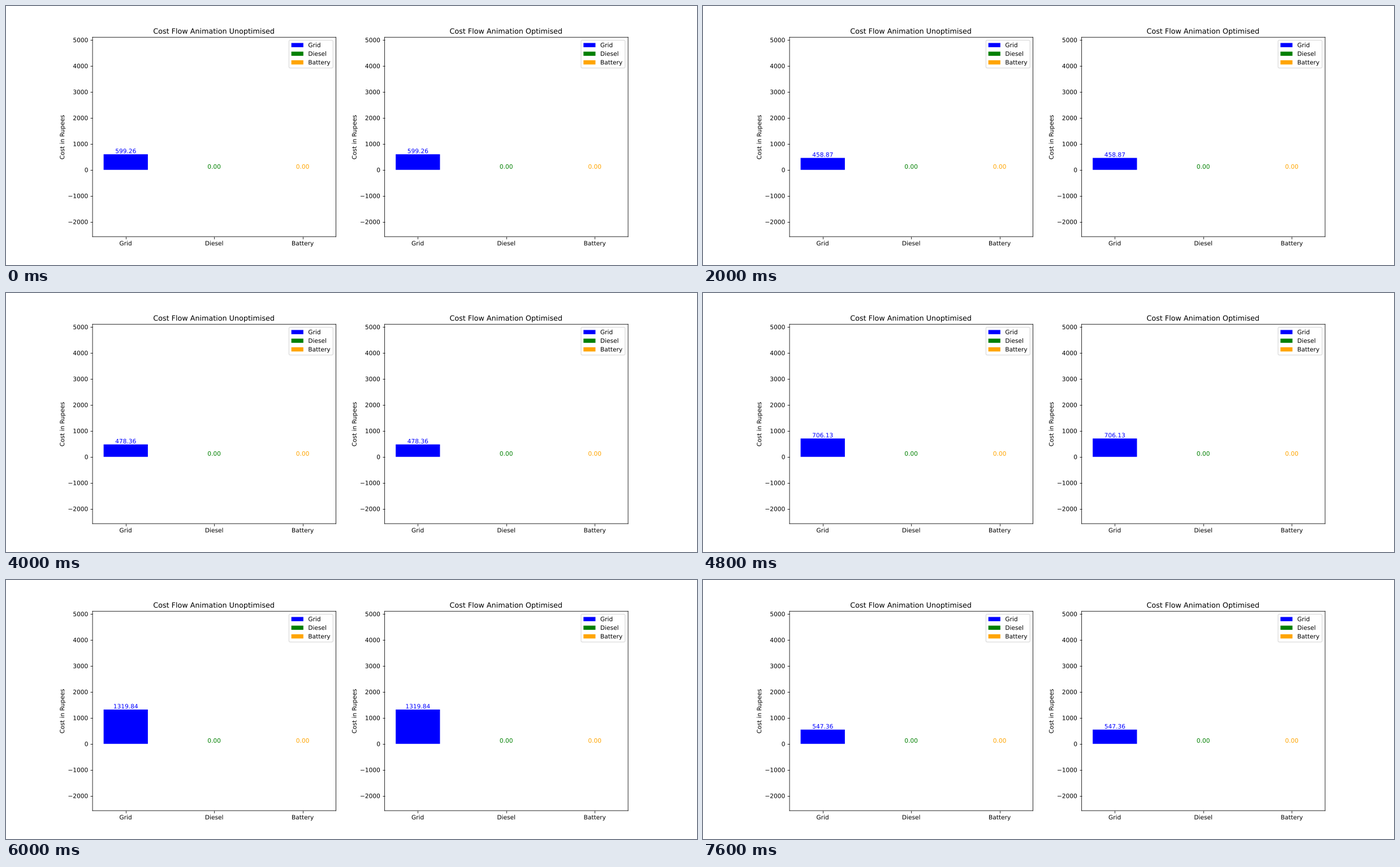
Recreate the animation shown at these times as a matplotlib script. Size 1222 by 458 pixels, loop 8 s.

```python
import matplotlib.pyplot as plt
from matplotlib.animation import FuncAnimation
from matplotlib.patheffects import Normal

WIDTH, HEIGHT, DPI = 1222, 458, 76.375
STEPS, STEP_MS = 20, 400
SOURCES = {"Grid": "blue", "Diesel": "green", "Battery": "orange"}

# Step at which the grid cost jumps -> new cost, held until the next jump
GRID_COST = {
    0: 599.26, 2: 578.43, 4: 458.87, 8: 492.17, 10: 478.36, 12: 706.13,
    13: 450.34, 14: 676.18, 15: 1319.84, 16: 1133.72, 17: 527.55, 18: 547.36,
}

# Soft sub-pixel edges: no snapping, and text drawn as outlines
plt.rcParams.update({
    "font.family": "DejaVu Sans",
    "path.snap": False,
    "path.effects": [Normal()],
})


def grid_cost(step):
    return GRID_COST[max(start for start in GRID_COST if start <= step)]


def make_panel(ax, title):
    names, colors = list(SOURCES), list(SOURCES.values())
    bars = ax.bar(names, [0, 0, 0], width=0.5, color=colors, label=names)
    labels = [
        ax.text(i, 0, "0.00", ha="center", va="bottom", color=color)
        for i, color in enumerate(colors)
    ]
    ax.set_xlim(-0.375, 2.375)
    ax.set_ylim(-2573, 5104)
    ax.set_title(title)
    ax.set_ylabel("Cost in Rupees")
    ax.legend(loc="upper right")
    # Only the grid source ever costs anything
    return bars[0], labels[0]


fig, axes = plt.subplots(
    1, 2, figsize=(WIDTH / DPI + 1e-6, HEIGHT / DPI + 1e-6), dpi=DPI)
dx, dy = 0.3 / WIDTH, 0.3 / HEIGHT
fig.subplots_adjust(left=0.125 + dx, right=0.9 + dx,
                    bottom=0.11 - dy, top=0.88 - dy)
panels = [
    make_panel(ax, f"Cost Flow Animation {kind}")
    for ax, kind in zip(axes, ["Unoptimised", "Optimised"])
]


def update(step):
    cost = grid_cost(step)
    for bar, label in panels:
        bar.set_height(cost)
        label.set_y(cost)
        label.set_text(f"{cost:.2f}")
    return [artist for panel in panels for artist in panel]


anim = FuncAnimation(
    fig, update, frames=STEPS, init_func=lambda: update(0),
    interval=STEP_MS, repeat=True, repeat_delay=0, blit=False,
)
plt.show()
```
